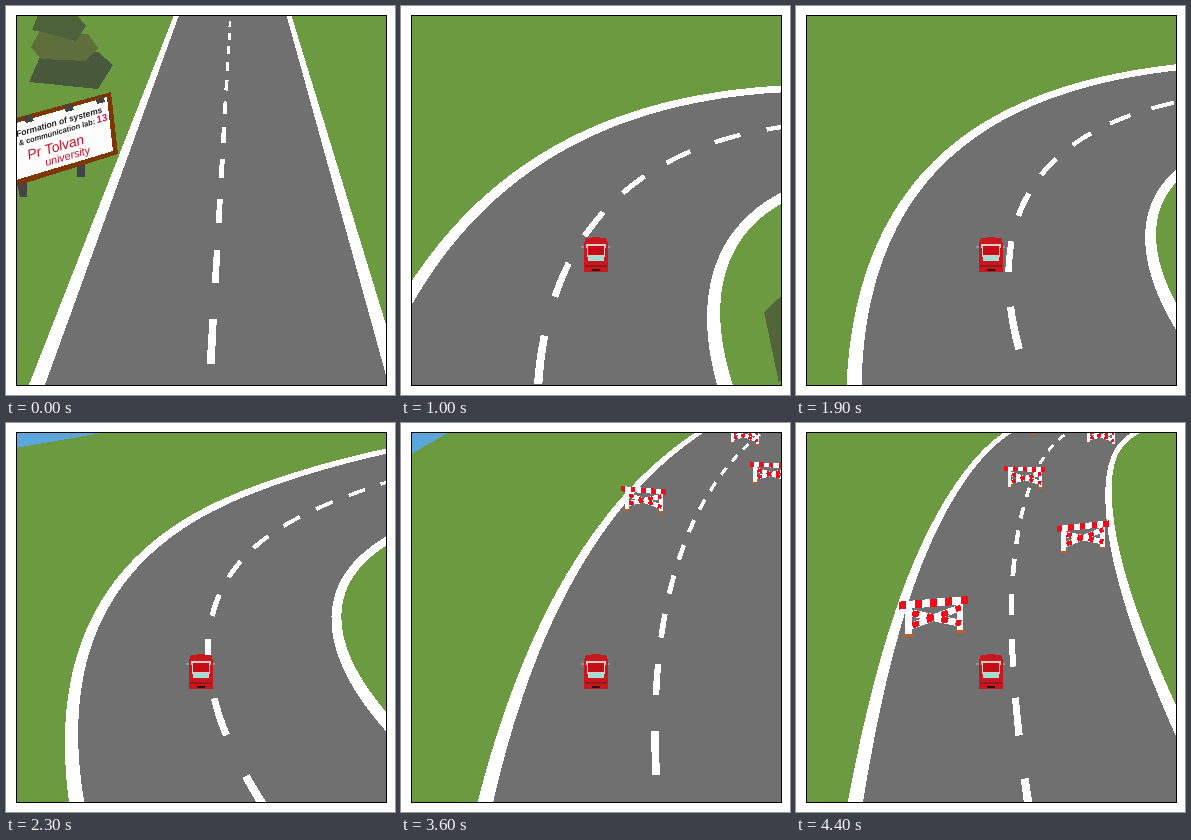
An HTML page that plays this animation: 389 by 389 pixels, repeating every 4.5 s.

```html
<!DOCTYPE html>
<html lang="en">
<head>
<meta charset="utf-8">
<title>Driving loop</title>
<style>
  html, body { margin: 0; width: 100%; height: 100%; overflow: hidden; background: #fff; }
  svg { display: block; width: 100vw; height: 100vh; }
  text { font-family: "Liberation Sans", Arial, sans-serif; }
</style>
</head>
<body>
<svg viewBox="0 0 389 389" shape-rendering="crispEdges">
  <defs>
    <clipPath id="view"><rect x="10" y="9" width="371" height="371"/></clipPath>
    <g id="barrier">
      <path d="M-25-30V-2M26-30V-2" stroke="#f4f4f4" stroke-width="6"/>
      <path d="M-30-1h9M22-1h9" stroke="#b5622c" stroke-width="3"/>
      <path d="M-27-25L27-9M-27-9L27-25" stroke="#fff" stroke-width="7"/>
      <path d="M-27-25L27-9M-27-9L27-25" stroke="#f00c18" stroke-width="6" stroke-dasharray="7 8" stroke-dashoffset="-6"/>
      <path d="M-34-32H34" stroke="#fff" stroke-width="8"/>
      <path d="M-34-32H34" stroke="#f00c18" stroke-width="8" stroke-dasharray="7 8.2"/>
    </g>
  </defs>
  <g clip-path="url(#view)">
    <rect x="10" y="9" width="371" height="371" fill="#6b9a41"/>
    <path id="water" fill="#5ba6db"/>
    <path id="bush" fill="#53663a"/>
    <path id="asphalt" fill="#707070"/>
    <path id="paint" fill="#fff"/>
    <g id="barriers"></g>
    <g id="roadside">
      <path d="M34 51L92 46 107 59 92 83 23 76Z" fill="#47593a"/>
      <path d="M33 26L82 28 92 42 80 55 35 53 25 41Z" fill="#5e6f3b"/>
      <path d="M32 9H71L80 20 70 35 40 27 26 24Z" fill="#4d613a"/>
      <path d="M71 159h8v12h-8zM11 177h10v14h-7z" fill="#444"/>
      <path d="M10 112L105 86 112 148 10 180Z" fill="#7d3606"/>
      <path d="M10 117L101 91 107 145 10 174Z" fill="#fcfcfc"/>
      <path d="M18 111l8-2 2 6-8 2zM58 100l8-2 2 6-8 2zM90 93l8-2 1 5-8 2z" fill="#444"/>
      <g transform="translate(11 131) rotate(-16)" font-style="italic">
        <text font-size="8.6" font-weight="bold" fill="#222">Formation of systems</text>
        <text y="9" font-size="7.6" font-weight="bold" fill="#222">&amp; communication lab:</text>
        <text x="81" y="9" font-size="10" font-weight="bold" fill="#d3145c">13</text>
        <text x="5" y="25" font-size="14" fill="#c8102c">Pr Tolvan</text>
        <text x="20" y="36" font-size="11" fill="#c8102c">university</text>
      </g>
    </g>
    <g id="car">
      <path d="M180 241h29" stroke="#8a9a9d" stroke-width="2"/>
      <path d="M185 232H191V231H199V232H205L207 237V266H183V237Z" fill="#c9171e"/>
      <path d="M185 238H205L203 255H187Z" fill="#e3c9c5"/>
      <path d="M187 240H203V249H187Z" fill="#c40d16"/>
      <path d="M188 250H202V255H188Z" fill="#9fe0d6"/>
      <path d="M184 260h22" stroke="#96161b" stroke-width="2"/>
      <path d="M191 264h8" stroke="#2c1012" stroke-width="2"/>
    </g>
  </g>
  <rect x="10.5" y="9.5" width="370" height="370" fill="none" stroke="#000"/>
</svg>
<script>
const LOOP = 4500, STEP = 100;
const RAD = Math.PI / 180;
const PERIOD = 0.225;      // ground distance between two dashes
const CAR_DEPTH = 1.523;   // ground depth of the car in front of the camera
const HORIZON = -159;
const FIRST = -8, LAST = 32, FINE = 20;

const $ = id => document.getElementById(id);
const mix = (a, b, k) => a + (b - a) * k;

// Bend of the road, in degrees per dash, along the track.
const BENDS = [[6, 12.1], [9, 9.7], [10, 7.9], [11, 4], [13, 3], [15, 2.2], [21, 1.8], [23, 3], [25, 6.5]];

// Time, place on the track, sideways place and heading of the road at the car.
const POSES = [
  [100, -3.2, -0.16, -1], [600, -1.2, -0.12, 7], [1000, 0.41, -0.055, 18.2],
  [1500, 2.41, 0.0575, 17.2], [2300, 5.68, 0.02, -3.6], [2900, 8.27, 0.036, 7],
  [3600, 12.13, 0.151, 8.7], [4400, 15.67, 0.055, -0.3]
];
const OPENING = [0, 0.19, 0.039, 3.6];

// Track place, sideways offset and yaw in degrees, far to near.
const BARRIERS = [[24.9, -0.24, 9], [24.8, 0.24, 9], [21.2, -0.02, 9], [18.62, 0.235, 18], [16.32, -0.21, 9]];

function bendAt(u) {
  const i = BENDS.findIndex(b => b[0] > u);
  if (i === 0) return BENDS[0][1];
  if (i < 0) return BENDS[BENDS.length - 1][1];
  const [u0, b0] = BENDS[i - 1], [u1, b1] = BENDS[i];
  return mix(b0, b1, (u - u0) / (u1 - u0));
}

function makeTrack(bend) {
  const points = [];
  let x = 0, z = 0, heading = 0;
  for (let i = 0; i <= (LAST - FIRST) * FINE; i++) {
    points.push([x, z, heading]);
    const turn = bend(FIRST + (i + 0.5) / FINE) * RAD / FINE;
    x += Math.sin(heading + turn / 2) * PERIOD / FINE;
    z += Math.cos(heading + turn / 2) * PERIOD / FINE;
    heading += turn;
  }
  return u => {
    const f = Math.max(0, Math.min(points.length - 1.001, (u - FIRST) * FINE));
    const i = Math.floor(f);
    return points[i].map((v, n) => mix(v, points[i + 1][n], f - i));
  };
}

const straight = makeTrack(() => 0);
const winding = makeTrack(bendAt);

function slope(i, n) {
  const a = POSES[Math.max(0, i - 1)], b = POSES[Math.min(POSES.length - 1, i + 1)];
  return (b[n] - a[n]) / (b[0] - a[0]);
}

function poseAt(t) {
  let i = 0;
  while (i < POSES.length - 2 && t >= POSES[i + 1][0]) i++;
  const a = POSES[i], b = POSES[i + 1], d = b[0] - a[0], k = (t - a[0]) / d;
  return a.map((v, n) =>
    v * (1 + 2 * k) * (1 - k) ** 2 + b[n] * k * k * (3 - 2 * k) +
    d * k * (1 - k) * (slope(i, n) * (1 - k) - slope(i + 1, n) * k));
}

// Returns a function from road coordinates to the screen.
function camera(track, [, place, side, heading]) {
  const [cx, cz, ch] = track(place);
  const yaw = ch - heading * RAD, c = Math.cos(yaw), s = Math.sin(yaw);
  return (u, lat, along = 0) => {
    const [px, pz, h] = track(u);
    const x = px + lat * Math.cos(h) + along * Math.sin(h) - cx;
    const z = pz - lat * Math.sin(h) + along * Math.cos(h) - cz;
    const scale = 620 / Math.max(0.3, CAR_DEPTH + x * s + z * c);
    return [195 + (side + x * c - z * s) * scale, scale + HORIZON];
  };
}

const outline = points => "M" + points.map(p => p.map(v => v.toFixed(1)).join(" ")).join("L") + "Z";

function strip(project, from, to, left, right, count) {
  const a = [], b = [];
  for (let i = 0; i <= count; i++) {
    const u = mix(from, to, i / count);
    a.push(project(u, left));
    b.unshift(project(u, right));
  }
  return outline(a.concat(b));
}

// A painted line: its width on screen depends on depth, not on direction.
function line(project, from, to, lat, width, count) {
  const a = [], b = [];
  for (let i = 0; i <= count; i++) {
    const u = mix(from, to, i / count);
    const [x, y] = project(u, lat);
    const [x0, y0] = project(u - 0.05, lat), [x1, y1] = project(u + 0.05, lat);
    const k = width * (y - HORIZON) / 2 / (Math.hypot(x1 - x0, y1 - y0) || 1);
    const nx = (y1 - y0) * k, ny = (x0 - x1) * k;
    a.push([x + nx, y + ny]);
    b.unshift([x - nx, y - ny]);
  }
  return outline(a.concat(b));
}

const barrierNodes = BARRIERS.map(() => {
  const node = document.createElementNS("http://www.w3.org/2000/svg", "use");
  node.setAttribute("href", "#barrier");
  $("barriers").appendChild(node);
  return node;
});

function drawBarrier(node, project, [u, lat, yaw]) {
  const half = 0.091, along = half * Math.tan(yaw * RAD);
  const [lx, ly] = project(u, lat - half, -along);
  const [rx, ry] = project(u, lat + half, along);
  const x = (lx + rx) / 2, y = (ly + ry) / 2, size = (y - HORIZON) / 373;
  node.setAttribute("transform", `matrix(${(rx - lx) / 68} ${(ry - ly) / 68} 0 ${size} ${x} ${y})`);
}

function draw(t) {
  const opening = t < STEP;
  const pose = opening ? OPENING : poseAt(t);
  const project = camera(opening ? straight : winding, pose);
  const from = pose[1] - 4, to = pose[1] + 13;
  const set = (id, d) => $(id).setAttribute("d", d);
  const show = (id, on) => $(id).setAttribute("display", on ? "inline" : "none");

  set("asphalt", strip(project, from, to, -0.32, 0.347, 170));
  let paint = line(project, from, to, -0.32, 0.028, 170) + line(project, from, to, 0.347, 0.028, 170);
  for (let n = Math.ceil(from); n < to; n++) paint += line(project, n - 0.255, n + 0.255, 0, 0.0155, 4);
  set("paint", paint);

  const patch = (u, points) => outline(points.map(([lat, along]) => project(u, lat, along)));
  set("water", patch(8.27, [[0.05, 3.43], [-0.306, 2.835], [-0.814, 2.057], [-1.83, 0.22], [-3.6, 0.9], [-2, 4.1]]));
  set("bush", patch(0.41, [[0.455, -0.05], [0.51, 0.05], [0.62, 0], [0.62, -0.2], [0.49, -0.22]]));
  BARRIERS.forEach((b, i) => drawBarrier(barrierNodes[i], project, b));

  show("roadside", opening);
  for (const id of ["car", "water", "bush", "barriers"]) show(id, !opening);
}

let start;
function tick(now) {
  start ??= now;
  draw(Math.floor(((now - start) % LOOP) / STEP) * STEP);
  requestAnimationFrame(tick);
}
draw(0);
requestAnimationFrame(tick);
</script>
</body>
</html>
```
